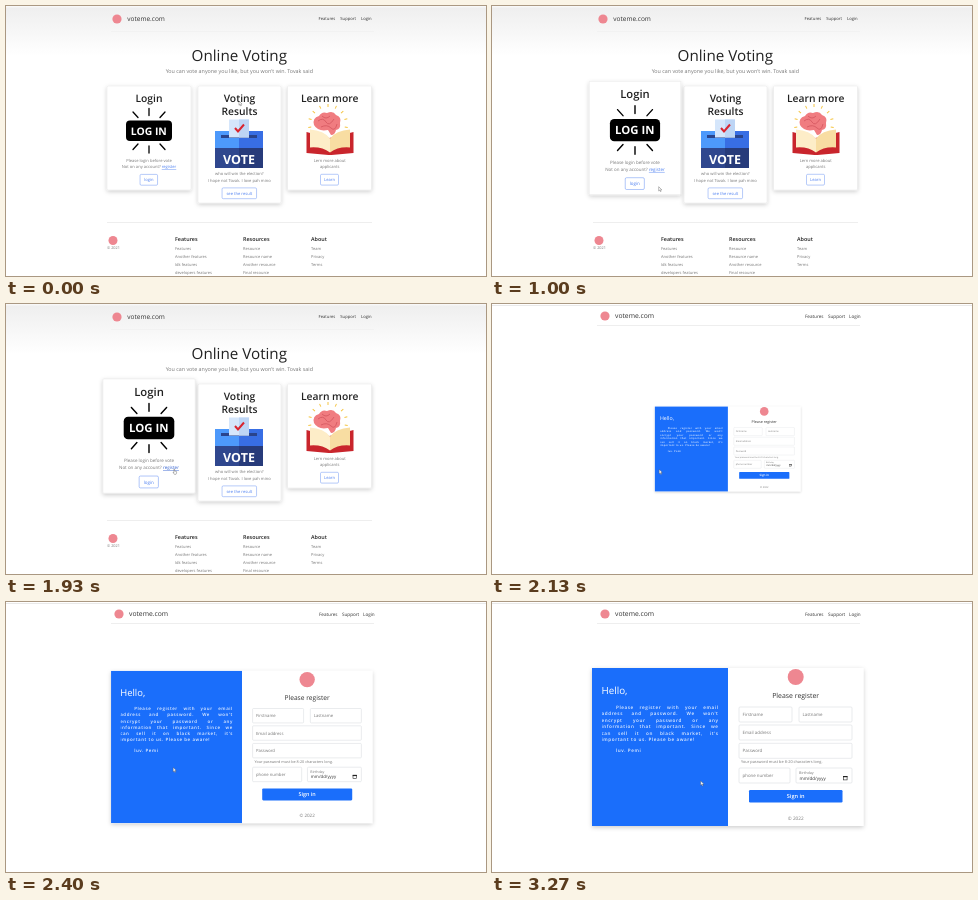
Write an HTML page that moves like this. It is 480 px wide and 270 px high and loops after 3.99 s.

```html
<!DOCTYPE html>
<html lang="en">
<head>
<meta charset="utf-8">
<title>Online voting</title>
<style>
  html, body { margin: 0; width: 100%; height: 100%; overflow: hidden; background: #fff; }
  svg { display: block; width: 100vw; height: 100vh; }
  text, p { font-family: "Open Sans", "Noto Sans", sans-serif; text-rendering: geometricPrecision; }
  p { margin: 0; font-size: 4.6px; font-weight: 600; line-height: 6.4px; letter-spacing: .58px;
      color: #e6f0ff; white-space: nowrap; text-align: justify; text-align-last: justify; }
  p:first-child { text-indent: 14.5px; }
  p.end { text-align-last: left; text-indent: 0; }
  p.sign { text-indent: 14.5px; }
</style>
</head>
<body>
<svg id="stage" viewBox="0 0 480 270"></svg>
<script>
const BLUE = '#1a6efb', LINK = '#4a7df0', GREY = '#777', DARK = '#222', LOGO = '#ee8791';
const NOTE = 4.1;  // size of the small print on the cards

// y is the vertical middle of the capitals
function text(str, x, y, size, { fill = GREY, weight = 400, anchor = 'start' } = {}) {
  return `<text x="${x}" y="${y + size * .35}" font-size="${size}" fill="${fill}" font-weight="${weight}" text-anchor="${anchor}">${str}</text>`;
}
const centred = (str, x, y, size, opts) => text(str, x, y, size, { ...opts, anchor: 'middle' });
const rect = (x, y, w, h, fill, extra = '') =>
  `<rect x="${x}" y="${y}" width="${w}" height="${h}" fill="${fill}" ${extra}/>`;
const path = (d, fill, extra = '') => `<path d="${d}" fill="${fill}" ${extra}/>`;
const logo = (x, y, r) => `<circle cx="${x}" cy="${y}" r="${r}" fill="${LOGO}"/>`;
const card = (x, w, h) => rect(x, 80, w, h, '#fff', 'rx="1" stroke="#ddd" stroke-width=".4" filter="url(#shadow)"');
const title = (str, x, y) => centred(str, x, y, 10.3, { fill: DARK, weight: 600 });
const button = (str, x, y, w) =>
  rect(x - w / 2, y - 5.4, w, 10.8, '#fff', `rx="1.2" stroke="${LINK}" stroke-width=".4"`) +
  centred(str, x, y, NOTE, { fill: LINK });

function header({ logoX, nameX, size, navSize, navX, y, lineY, line }) {
  return logo(logoX, y, 4.6) + text('voteme.com', nameX, y, size, { fill: '#333' }) +
    ['Features', 'Support', 'Login'].map((s, i) => text(s, navX[i], y, navSize, { fill: '#333' })).join('') +
    rect(105, lineY, 263, .5, line);
}

const loginIcon =
  path('M127 106l5 5.500M143 102.500v7M159 106l-5 5.500M132 138l-5 5.500M143 140v7M154 138l5 5.500',
    'none', 'stroke="#000" stroke-width="1.3" stroke-linecap="round"') +
  rect(120, 114.5, 46, 20.5, '#000', 'rx="4"') +
  centred('LOG IN', 142.8, 125, 10.4, { fill: '#fff', weight: 700 });

const ballotIcon =
  rect(209, 125, 48, 17, '#4d99fb') + rect(233, 125, 24, 17, '#386ee4') +
  rect(215, 129, 36, 3, '#2a448c') +
  rect(223, 113.5, 20, 18, '#d5e6fb') + rect(233, 113.5, 10, 18, '#bdd5f5') +
  path('M229 122l3 3.500l6-7', 'none', 'stroke="#d9252f" stroke-width="2"') +
  rect(209, 142, 48, 20, '#2f478e') + rect(233, 142, 24, 20, '#273b7a') +
  centred('VOTE', 233, 153.5, 12.5, { fill: '#fff', weight: 700 });

const rays = Array.from({ length: 9 }, (_, i) =>
  path('M17 0h3', 'none', `stroke="#f5c542" stroke-width="1" transform="translate(322 118) rotate(${-190 + i * 25})"`)).join('');
const bookIcon = rays +
  path('M300.500 126l23 6l24-6v21l-22 2h-3l-22-2z', '#c9252c') +
  path('M304 123.500q14 1 20 9v14q-8-6-20-5z', '#fdedc8') +
  path('M344 123.500q-14 1-20 9v14q8-6 20-5z', '#f8dda2') +
  path('M308 119q-2-7 5-9q3-5 8-3q6-3 9 2q6 2 4 8q1 6-4 7q-1 5-5 5l-3-5q-10 2-14-5z', '#f07c80') +
  path('M312 115q5-4 8 1t8-3M316 110q4 4 8 0M315 121q6-3 10 1t6-4', 'none', 'stroke="#d4565f" stroke-width=".8"');

const footerColumns = [
  [169, 'Features', 'Features', 'Another features', 'Idk features', 'developers features'],
  [237, 'Resources', 'Resource', 'Resource name', 'Another resource', 'Final resource'],
  [305, 'About', 'Team', 'Privacy', 'Terms'],
].map(([x, head, ...items]) =>
  text(head, x, 233.5, 5.4, { fill: DARK, weight: 600 }) +
  items.map((s, i) => text(s, x, 242.5 + i * 7.9, 4)).join('')).join('');

const homePage =
  rect(0, 0, 480, 50, 'url(#fade)') + rect(0, 0, 480, 1.5, '#f8f8f8') +
  header({ logoX: 111, nameX: 121.3, size: 6.5, navSize: 4.2, navX: [312.5, 334.3, 355], y: 13, lineY: 25, line: '#ececec' }) +
  centred('Online Voting', 233.3, 49.4, 15.2, { fill: DARK }) +
  centred("You can vote anyone you like, but you won't win. Tovak said", 233.3, 64.7, 5.35) +
  card(192, 83, 117) + title('Voting', 233.5, 92) + title('Results', 233.5, 105.5) + ballotIcon +
  centred('who will win the election?', 233.3, 167.7, NOTE) +
  centred('I hope not Tovak. I love pah mino', 233.3, 174.5, NOTE) + button('see the result', 233.3, 187.3, 34.5) +
  card(281.5, 84, 104) + title('Learn more', 323.7, 92) + bookIcon +
  centred('Lern more about', 323.7, 154.3, NOTE) + centred('applicants', 323.7, 161, NOTE) +
  button('Learn', 323.5, 173.7, 18) +
  rect(101, 216, 265, .5, '#ddd') + logo(107, 234.5, 4.5) + text('© 2021', 101, 242, 3.8) + footerColumns +
  `<g id="loginCard">${card(101, 84, 104)}${title('Login', 143, 92)}${loginIcon}
    ${centred('Please login before vote', 143, 154.1, NOTE)}
    ${centred('Not on any account? <tspan id="link" text-decoration="underline">register</tspan>', 143, 160.7, NOTE)}
    ${button('login', 142.8, 173.8, 17.5)}</g>`;

const field = (label, x, y, w) =>
  rect(x, y, w, 15, '#fff', 'rx="1" stroke="#d3d7db" stroke-width=".5"') + text(label, x + 3.5, y + 7.6, 4.4);

const message = ['Please register with your email', "address and password. We won't", 'encrypt your password or any',
  'information that important. Since we', "can sell it on black market, it's", 'important to us. Please be aware!'];
const letter = message.map((s, i) => `<p class="${i === message.length - 1 ? 'end' : ''}">${s}</p>`).join('');

const registerPage =
  rect(0, 0, 480, 270, '#fff') + rect(0, 1, 480, .8, '#e4e4e4') +
  header({ logoX: 113, nameX: 123, size: 6.75, navSize: 4.6, navX: [313, 336, 357], y: 12, lineY: 21, line: '#ddd' }) +
  `<g id="panel">
    ${rect(100, 66, 271.5, 158, '#fff', 'filter="url(#shadow)"')}${rect(100, 66, 136, 158, BLUE)}
    ${text('Hello,', 109.5, 88.3, 9.8, { fill: '#fff' })}
    <foreignObject x="109.500" y="103" width="117" height="42">${letter}</foreignObject>
    <foreignObject x="109.500" y="145.500" width="117" height="8"><p class="end sign">luv. Pemi</p></foreignObject>
    ${logo(303.7, 75, 8)}${centred('Please register', 303.7, 94, 6.9, { fill: '#333' })}
    ${field('Firstname', 247, 105, 53)}${field('Lastname', 307, 105, 53)}
    ${field('Email address', 247, 123, 113)}${field('Password', 247, 141.3, 113)}
    ${text('Your password must be 8-20 characters long.', 249, 160, 3.9)}
    ${field('phone number', 247, 166, 51)}${field('', 304, 166, 56)}
    ${text('Birthday', 307, 170.7, 3.7)}${text('mm/dd/yyyy', 307.5, 176, 4.5, { fill: '#333' })}
    ${rect(351.3, 174.3, 3.8, 3.6, 'none', 'stroke="#222" stroke-width=".6"')}${rect(351, 174, 4.4, 1.2, '#222')}
    ${rect(257, 188, 93.5, 12.5, BLUE, 'rx="1.2"')}
    ${centred('Sign in', 303.7, 194.2, 5.6, { fill: '#fff', weight: 600 })}
    ${centred('© 2022', 303.7, 216.3, 4.7)}
  </g>`;

const stage = document.getElementById('stage');
stage.innerHTML = `<defs>
    <linearGradient id="fade" x2="0" y2="1"><stop stop-color="#eee"/><stop offset="1" stop-color="#fff"/></linearGradient>
    <filter id="shadow" x="-10%" y="-10%" width="120%" height="125%">
      <feDropShadow dx="0" dy="1.500" stdDeviation="2" flood-color="#000" flood-opacity=".2"/></filter>
  </defs>
  <g id="home">${homePage}</g><g id="register">${registerPage}</g>
  <g id="cursor" stroke="#555" stroke-width=".4" fill="#fff">
    <path id="arrow" d="M0 0v4.300l1-.9.7 1.500.7-.3-.7-1.500h1.400z"/>
    <path id="hand" d="M.7-.4h.7v2l2 .5v1.500l-.6 1.200h-1.700l-1.300-2 .9.200z"/>
  </g>`;
const $ = id => document.getElementById(id);
const show = (id, on) => $(id).setAttribute('display', on ? 'inline' : 'none');
const clamp = v => Math.min(1, Math.max(0, v));

// CSS "ease": cubic-bezier(.25, .1, .25, 1)
function ease(x) {
  const bezier = (a, b, s) => 3 * a * s * (1 - s) ** 2 + 3 * b * s * s * (1 - s) + s ** 3;
  let lo = 0, hi = 1;
  for (let i = 0; i < 24; i++) {
    const mid = (lo + hi) / 2;
    if (bezier(.25, .25, mid) < x) lo = mid; else hi = mid;
  }
  return bezier(.1, 1, lo);
}
const progress = (t, start, duration) => ease(clamp((t - start) / duration));

// time, x, y
const pointer = [[0, 233, 95], [133, 306, 157], [267, 306, 157], [467, 400, 117], [600, 452, 175],
  [733, 290, 214], [800, 189, 207], [1000, 166.7, 180.7], [1333, 167.2, 165.5], [2933, 167.2, 165.5],
  [3133, 300, 195], [3266, 208.7, 179]];

function pointerAt(t) {
  const next = pointer.findIndex(p => p[0] > t);
  if (next < 0) return pointer[pointer.length - 1].slice(1);
  const [t0, x0, y0] = pointer[next - 1], [t1, x1, y1] = pointer[next];
  const k = (t - t0) / (t1 - t0);
  return [x0 + (x1 - x0) * k, y0 + (y1 - y0) * k];
}

function scaleAbout(id, x, y, s) {
  $(id).setAttribute('transform', `translate(${x} ${y}) scale(${s}) translate(${-x} ${-y})`);
}

const LOOP = 3990, STEP = 200 / 3;

function draw(now) {
  const t = Math.floor((now % LOOP + 4) / STEP) * STEP;
  const registering = t >= 1999;
  const overLink = t >= 1399 && !registering;
  show('home', !registering);
  show('register', registering);
  scaleAbout('loginCard', 143, 132, 1 + .1 * progress(t, 840, 250));
  scaleAbout('panel', 235.75, 145, progress(t, 1946, 600));
  $('link').setAttribute('fill', overLink ? '#2f5fd0' : LINK);
  show('arrow', !overLink);
  show('hand', overLink);
  $('cursor').setAttribute('transform', `translate(${pointerAt(t)})`);
}

const start = performance.now();
function tick() {
  draw(performance.now() - start);
  requestAnimationFrame(tick);
}
tick();
</script>
</body>
</html>
```
